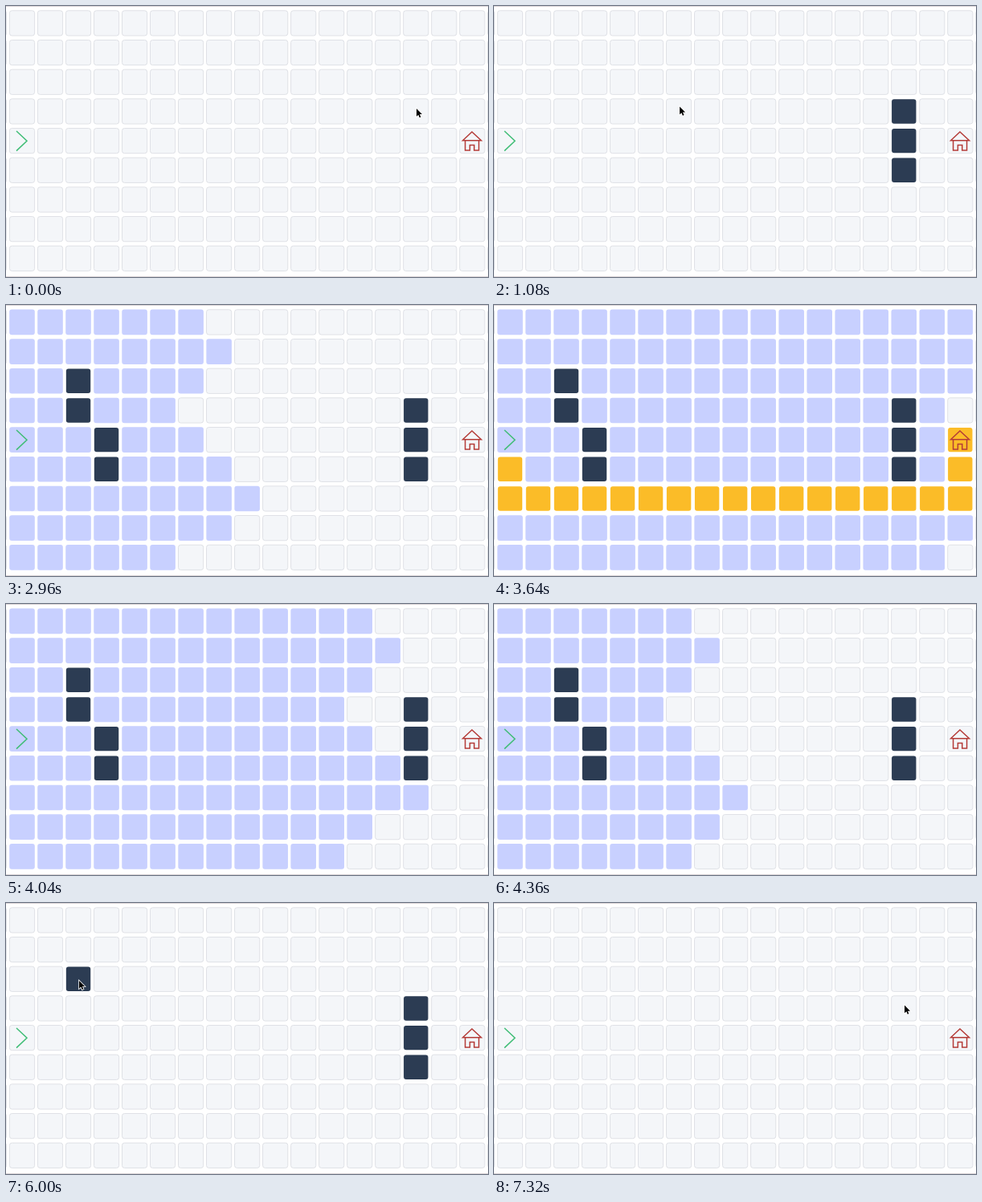
These frames come from a looping animation (600x338 px, 7360 ms). An HTML page with a canvas:

```html
<!DOCTYPE html>
<html lang="en">
<head>
<meta charset="utf-8">
<title>Breadth-first search</title>
<style>
  html, body { margin: 0; width: 100%; height: 100%; overflow: hidden; background: #fff; }
  canvas { display: block; }
</style>
</head>
<body>
<canvas id="stage" width="600" height="338"></canvas>
<script>
const ctx = document.getElementById('stage').getContext('2d');
const COLS = 17, ROWS = 9, START = [0, 4], GOAL = [16, 4];
const STEP = 40, FRAMES = 184; // the second half plays the first half backwards
const WALL = '#2c3c53', SEEN = '#c8d0ff', PATH = '#fbbc28';
const CLICK = 180, CURSOR_END = 2320, PATH_START = 3500, PATH_STEP = 6;

const key = (c, r) => c + ',' + r;
const centre = (c, r) => [20 + 35.02 * c, 21.4 + 36.68 * r];

// a downward stroke of clicked cells
const stroke = (c, r, count, time) =>
  Array.from({ length: count }, (_, i) => ({ c, r: r + i, time: time + i * CLICK }));
const walls = [...stroke(14, 3, 3, 240), ...stroke(2, 2, 2, 1320), ...stroke(3, 4, 2, 1700)];

function search() {
  const closed = new Set(walls.map(w => key(w.c, w.r)));
  const order = [START];
  closed.add(key(...START));
  for (const [c, r] of order) {
    for (const [dc, dr] of [[0, -1], [1, 0], [0, 1], [-1, 0]]) {
      const x = c + dc, y = r + dr;
      if (x < 0 || y < 0 || x >= COLS || y >= ROWS || closed.has(key(x, y))) continue;
      closed.add(key(x, y));
      order.push([x, y]);
      if (x === GOAL[0] && y === GOAL[1]) return order;
    }
  }
  return order;
}

const visited = search();
const route = [GOAL, [16, 5]];
for (let c = 16; c >= 0; c--) route.push([c, 6]);
route.push([0, 5]);

// time, number of visited cells
const progress = [[2400, 0], [2520, 15], [2960, 62], [3000, 63], [PATH_START, visited.length]];
const pointer = [[0, 511, 128], ...walls.map(w => {
  const [x, y] = centre(w.c, w.r);
  return [w.time, x + 1, y - 6];
})];

function track(keys, t) {
  const next = keys.findIndex(k => k[0] > t);
  if (next === 0) return keys[0].slice(1);
  if (next < 0) return keys[keys.length - 1].slice(1);
  const a = keys[next - 1], b = keys[next];
  const k = (t - a[0]) / (b[0] - a[0]);
  return a.slice(1).map((v, j) => v + (b[j + 1] - v) * k);
}

function cell(c, r, fill) {
  const [x, y] = centre(c, r);
  const half = !fill ? 15.6 : fill === SEEN ? 15.8 : 15.2;
  ctx.beginPath();
  ctx.roundRect(x - half, y - half, 2 * half, 2 * half, 3);
  ctx.fillStyle = fill || '#f4f6f9';
  ctx.fill();
  if (!fill) {
    ctx.strokeStyle = '#dfe1e6';
    ctx.lineWidth = 1;
    ctx.stroke();
  }
}

function line(d, color) {
  ctx.strokeStyle = color;
  ctx.lineWidth = 1.5;
  ctx.stroke(new Path2D(d));
}

function drawCursor(x, y) {
  const arrow = new Path2D('M0 0V9.8L2.3 7.7L3.8 11.2L5.4 10.5L3.9 7.1H7Z');
  ctx.save();
  ctx.translate(x, y);
  ctx.lineWidth = 1.6;
  ctx.strokeStyle = '#fff';
  ctx.stroke(arrow);
  ctx.fillStyle = '#000';
  ctx.fill(arrow);
  ctx.restore();
}

function draw(t) {
  ctx.fillStyle = '#fff';
  ctx.fillRect(0, 0, 600, 338);
  ctx.fillStyle = '#ddd6d9';
  ctx.fillRect(0, 0, 600, 1);
  ctx.fillRect(0, 337, 600, 1);

  const fills = new Map();
  const paint = (cells, color) => cells.forEach(([c, r]) => fills.set(key(c, r), color));
  const pathLength = Math.max(0, Math.floor((t - PATH_START) / PATH_STEP));
  paint(walls.filter(w => t >= w.time).map(w => [w.c, w.r]), WALL);
  paint(visited.slice(0, Math.round(track(progress, t)[0])), SEEN);
  paint(route.slice(0, pathLength), PATH);

  for (let r = 0; r < ROWS; r++)
    for (let c = -1; c <= COLS; c++) cell(c, r, fills.get(key(c, r)));

  line('M13 156L26 168.3L13 180.6', '#3fbd75');
  line('M568.6 167.8L580 157L591.6 167.8ZM571.6 167.8V180H577.4V173.6H582.8V180H588.6V167.8', '#b43c38');
  if (t < CURSOR_END) drawCursor(...track(pointer, t));
}

function tick(now) {
  const i = Math.floor(now / STEP) % FRAMES;
  draw(Math.min(i, FRAMES - i) * STEP);
  requestAnimationFrame(tick);
}
draw(0);
requestAnimationFrame(tick);
</script>
</body>
</html>
```
